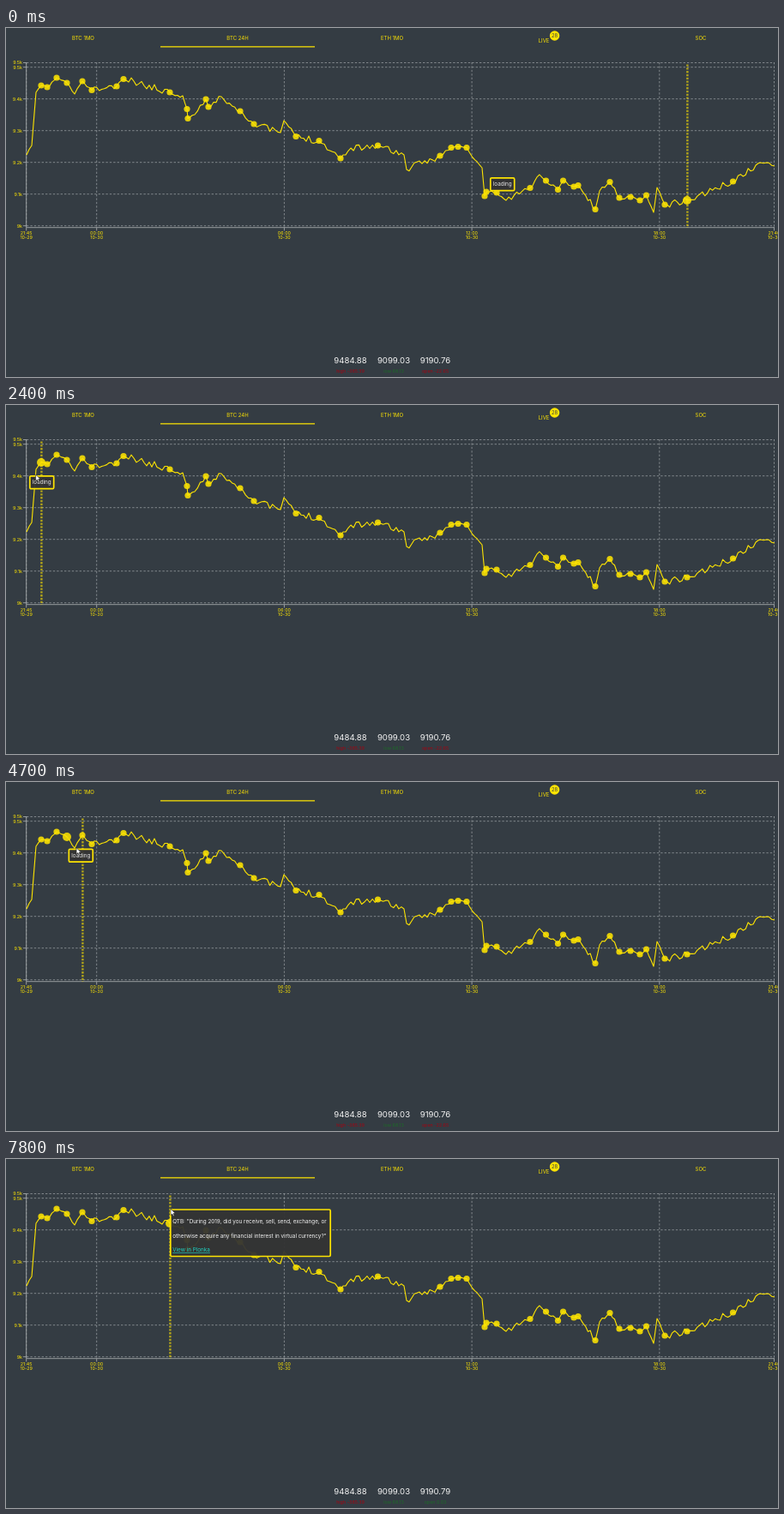
An HTML page that plays this animation: 900x407 px, repeating every 8000 ms.

```html
<!DOCTYPE html>
<html lang="en">
<head>
<meta charset="utf-8">
<title>Price chart</title>
<style>
  html, body { margin: 0; width: 100%; height: 100%; overflow: hidden; background: #343c43; }
  svg { display: block; width: 900px; height: 407px; font-family: Inter, "Open Sans", sans-serif; }
  text { white-space: pre; }
</style>
</head>
<body>
<svg id="stage" viewBox="0 0 900 407"></svg>
<script>
const YELLOW = '#fde402', GREY = '#959a9d', RED = '#a30412', GREEN = '#1d6c28';
const LOOP = 8000, STEP = 100;
const TIP_LAG = 250;

// posts marked on the price line
const posts = [
  [41, 67], [48, 69], [59, 58], [71, 64], [89, 62], [100, 72.5], [129, 68], [137, 59.5], [191, 75],
  [211, 94.5], [212, 105.5], [233, 83], [236, 92], [273, 97], [289, 112], [338, 126.5], [365, 131.5],
  [390, 152], [433.5, 137], [506, 149], [519, 139.5], [527, 138.5], [537, 139.5], [558, 196], [560, 191],
  [572, 192], [611, 186.5], [629.5, 178], [643.5, 188.5], [649.5, 178], [662, 185], [667, 183.5],
  [687, 211.5], [704, 179.5], [715, 198], [728, 197], [739, 201], [746.5, 195], [768, 206], [794, 201],
  [847.5, 179]
];

// where the trend turns between posts
const turns = [
  [24, 148], [30, 137], [35, 75], [80, 77], [206, 79], [220, 101], [251, 80], [320, 122], [324, 108],
  [402, 140], [464, 148], [467, 165], [544, 151], [555, 163], [583, 201], [622, 171], [692, 190],
  [755, 215], [759, 186], [880, 157], [896, 161]
];

const tips = [
  { w: 29.5, lines: ['loading'] },
  { from: 1600, to: 2400, w: 209, lines: [
    'Are you a developer interested in understanding the process for',
    'consensus changes in bitcoin? Are you interested in helping review',
    'upcoming changes to bitcoin or building on cutting edge bitcoin',
    'technology? Then you should sign up for the taproot bip review.'] },
  { from: 2800, to: 3700, w: 203, lines: [
    'Why Bitcoin Is the Perfect Haven for Argentines in This Economic',
    'Crunch'] },
  { from: 5600, to: 7200, w: 195, lines: [
    'Show of votes who thinks a country will announce it is holding',
    'bitcoin as part of its national reserves by 2025.'] },
  { from: 7700, to: LOOP, w: 188, lines: [
    'QTB: "During 2019, did you receive, sell, send, exchange, or',
    'otherwise acquire any financial interest in virtual currency?"'] }
];

// time, x, y
const mousePath = [
  [-TIP_LAG, 565, 174], [0, 794, 201], [450, 85.5, 83], [600, 42, 82], [700, 28, 82],
  [2300, 28, 82], [2600, 48, 79.7], [3700, 48, 79.7], [5300, 102.5, 75], [6900, 102.5, 75],
  [7500, 192, 58.2], [LOOP, 192, 58.2]
];

const mix = (a, b, p) => a + (b - a) * p;

function mouseAt(t) {
  const i = Math.max(1, mousePath.findIndex(key => key[0] >= t));
  const [a, b] = [mousePath[i - 1], mousePath[i]];
  const p = (t - a[0]) / (b[0] - a[0]);
  return [mix(a[1], b[1], p), mix(a[2], b[2], p)];
}

const nearestPost = x => posts.reduce((a, b) => Math.abs(b[0] - x) < Math.abs(a[0] - x) ? b : a);

// a five-minute sample every 3 px, jittering around the trend
function priceLine() {
  let seed = 11;
  const random = () => (seed = seed * 16807 % 2147483647) / 2147483647;
  const keys = [...posts, ...turns].sort((a, b) => a[0] - b[0]);
  const line = [keys[0]];
  for (let i = 1; i < keys.length; i++) {
    const [x0, y0] = keys[i - 1], [x1, y1] = keys[i];
    const n = Math.round((x1 - x0) / 3.03);
    for (let k = 1; k < n; k++) {
      line.push([mix(x0, x1, k / n), mix(y0, y1, k / n) + (random() - 0.5) * Math.min(n, 8)]);
    }
    line.push(keys[i]);
  }
  return 'M' + line.join('L');
}

// y is the middle of the capitals
function label(x, y, str, size, { fill = YELLOW, anchor = 'middle', more = '' } = {}) {
  return `<text x="${x}" y="${y + size * 0.36}" font-size="${size}" fill="${fill}" text-anchor="${anchor}" ${more}>${str}</text>`;
}
const path = (d, stroke, width, more = '') =>
  `<path d="${d}" fill="none" stroke="${stroke}" stroke-width="${width}" ${more}/>`;

function header() {
  const tabs = ['BTC 1MO', 'BTC 24H', 'ETH 1MO', '', 'SOC'];
  return tabs.map((s, i) => label(90 + 180 * i, 11.7, s, 6)).join('') +
    label(627, 14.5, 'LIVE', 6) +
    path('M180 21.9H360', YELLOW, 1.3) +
    `<circle cx="639.6" cy="9" r="5.7" fill="${YELLOW}"/>` +
    label(639.6, 9, '28', 5.8, { fill: '#343c43' });
}

function axes() {
  let grid = '', ticks = 'M23.7 40V232.7H896', text = '';
  const row = (y, s) => {
    grid += `M24 ${y}H896`;
    ticks += `M20 ${y}h3.7`;
    text += label(19, y, s, 5.4, { anchor: 'end' });
  };
  const col = (x, time, day) => {
    grid += `M${x} 40V232`;
    ticks += `M${x} 232.7v3.7`;
    text += label(x, 238.8, time, 5.4) + label(x, 244.4, day, 5.4);
  };
  row(40.5, '9.5k');
  for (let i = 0; i <= 5; i++) row(45.7 + 37 * i, (95 - i) / 10 + 'k');
  col(23.7, '21:45', '10-29');
  for (let i = 0; i < 4; i++) col(105.7 + 218.7 * i, String(6 * i).padStart(2, '0') + ':00', '10-30');
  col(895.5, '21:40', '10-30');
  return path(grid, GREY, 0.8, 'stroke-dasharray="2.4 2"') + path(ticks, '#a3a7a9', 0.9) + text;
}

function footer() {
  const stat = (x, value, note, fill, id) =>
    label(x, 387.5, value, 9.6, { fill: '#f2f2f2', more: `id="${id}"` }) +
    label(x, 399.7, note, 5.4, { fill, more: `id="${id}Note"` });
  return stat(401.5, '9484.88', 'high -385.39', RED, 'high') +
    stat(452, '9099.03', 'low 68.13', GREEN, 'low') +
    stat(500.5, '9190.76', 'open -22.65', RED, 'open');
}

function tipBox({ w, lines }, i) {
  const h = i ? 23.3 + 16.4 * lines.length : 16.5;
  const row = (s, n, fill, more) => label(3.2, 14.7 + 16.4 * n, s, 6.35, { fill, anchor: 'start', more });
  const body = i
    ? lines.map((s, n) => row(s, n, '#f4f4f4')).join('') +
      row('View in Plonka', lines.length, '#1fd6c4', 'text-decoration="underline"')
    : label(w / 2, 8, lines[0], 6.35, { fill: '#e6e6e6' });
  return `<g class="tip"><rect x=".8" y=".8" width="${w - 1.6}" height="${h - 1.6}" rx="1.4"
    fill="#333" fill-opacity=".94" stroke="${YELLOW}" stroke-width="1.7"/>${body}</g>`;
}

const stage = document.getElementById('stage');
stage.innerHTML = header() + axes() +
  path(priceLine(), YELLOW, 1.1, 'stroke-linejoin="round"') +
  path('M.4 42.5V233', YELLOW, 2.4, 'id="guide" stroke-dasharray="2.3 1.5" opacity=".62"') +
  `<g fill="${YELLOW}" fill-opacity=".87">` +
  posts.map(([x, y]) => `<circle class="post" cx="${x}" cy="${y}" r="3.6"/>`).join('') + '</g>' +
  footer() + tips.map(tipBox).join('') +
  '<path id="mouse" stroke="#222" stroke-width=".6" stroke-linejoin="round" fill="#fff"/>';

const [guide, mouse, open, openNote] =
  ['guide', 'mouse', 'open', 'openNote'].map(id => document.getElementById(id));
const dots = [...stage.querySelectorAll('.post')];
const boxes = [...stage.querySelectorAll('.tip')];
const ARROW = 'M0 0V7.4L1.8 5.8L3 8.5L4.2 8L3.1 5.3H5.4Z';
const HAND = 'M0 .6Q.8-.3 1.4.6V3L4.4 3.8Q5 4 4.8 5L4.2 7.6H1L-1.2 4.6Q-1 3.8 0 4.4Z';
const place = (el, x, y) => el.setAttribute('transform', `translate(${x} ${y})`);
const show = (el, on) => el.setAttribute('display', on ? 'inline' : 'none');

function draw(t) {
  const [mx, my] = mouseAt(t);
  const onPost = t >= 5300 && t < 7000;
  place(mouse, mx, my);
  mouse.setAttribute('d', onPost ? HAND : ARROW);
  show(mouse, t >= STEP);
  place(guide, nearestPost(mx)[0], 0);

  // the enlarged post follows the guide one step later
  const active = nearestPost(mouseAt(Math.max(0, t - STEP))[0]);
  dots.forEach((dot, i) => dot.setAttribute('r', posts[i] === active && !onPost ? 5 : 3.6));

  const shown = Math.max(0, tips.findIndex(tip => t >= tip.from && t < tip.to));
  const [x, y] = mouseAt(t - TIP_LAG);
  boxes.forEach((box, i) => show(box, i === shown));
  place(boxes[shown], x - 1, y);

  const risen = t >= 4800;
  open.textContent = risen ? '9190.79' : '9190.76';
  openNote.textContent = risen ? 'open 0.03' : 'open -22.65';
  openNote.setAttribute('fill', risen ? GREEN : RED);
}

let start;
function tick(now) {
  start ??= now;
  draw(Math.floor((now - start) % LOOP / STEP) * STEP);
  requestAnimationFrame(tick);
}
draw(0);
requestAnimationFrame(tick);
</script>
</body>
</html>
```
